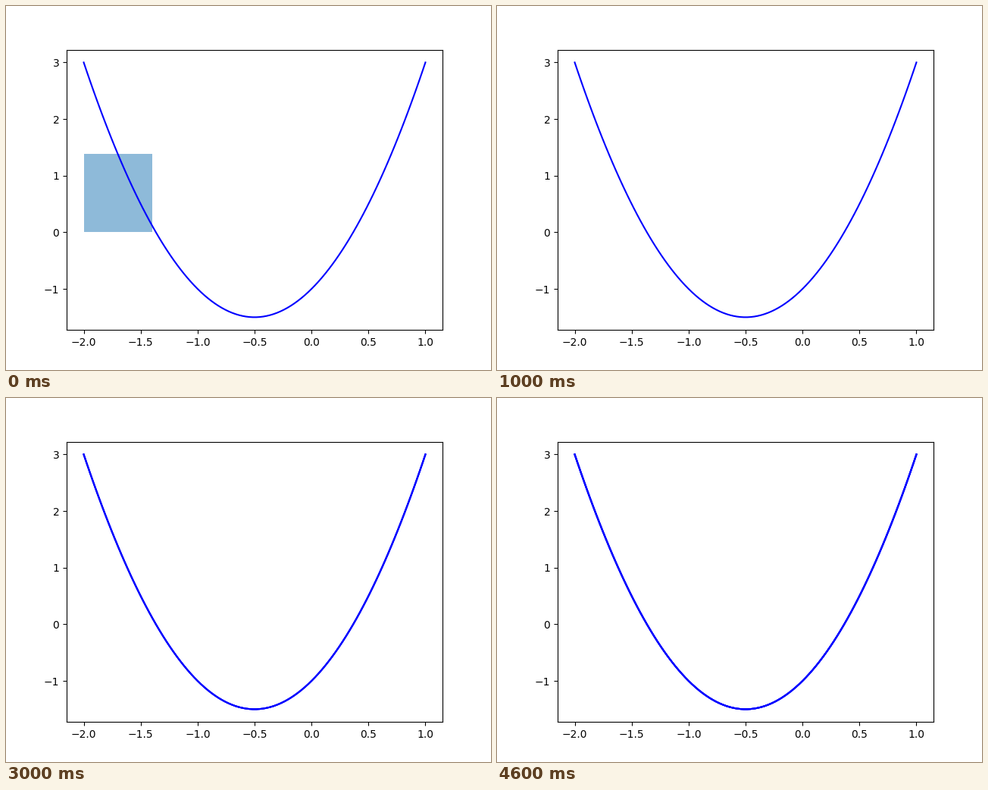
Recreate the animation shown at these times as a matplotlib script. Size 640 by 480 pixels, loop 5000 ms.

```python
import numpy as np
import matplotlib.pyplot as plt
from matplotlib.animation import FuncAnimation

A, B = -2, 1
STEPS = 5


def f(x):
    return 2 * x**2 + 2 * x - 1


fig, ax = plt.subplots(figsize=(6.4, 4.8), dpi=100)
x = np.linspace(A, B, 100)

# Identical curves stack up, so the antialiased edge darkens step by step.
curves = [ax.plot(x, f(x), color="b", lw=1.5)[0] for _ in range(STEPS - 1)]

# First midpoint rectangle
width = (B - A) / STEPS
bar = ax.bar(A, f(A + width / 2), width=width, align="edge",
             color="tab:blue", alpha=0.5)[0]

ax.set_xlim(A - 0.15, B + 0.15)
ax.set_ylim(-1.725, 3.225)


def update(i):
    bar.set_visible(i == 0)
    for k, curve in enumerate(curves):
        curve.set_visible(k < max(i, 1))
    return [bar, *curves]


anim = FuncAnimation(fig, update, frames=STEPS, interval=1000,
                     repeat=True, repeat_delay=0)
plt.show()
```
